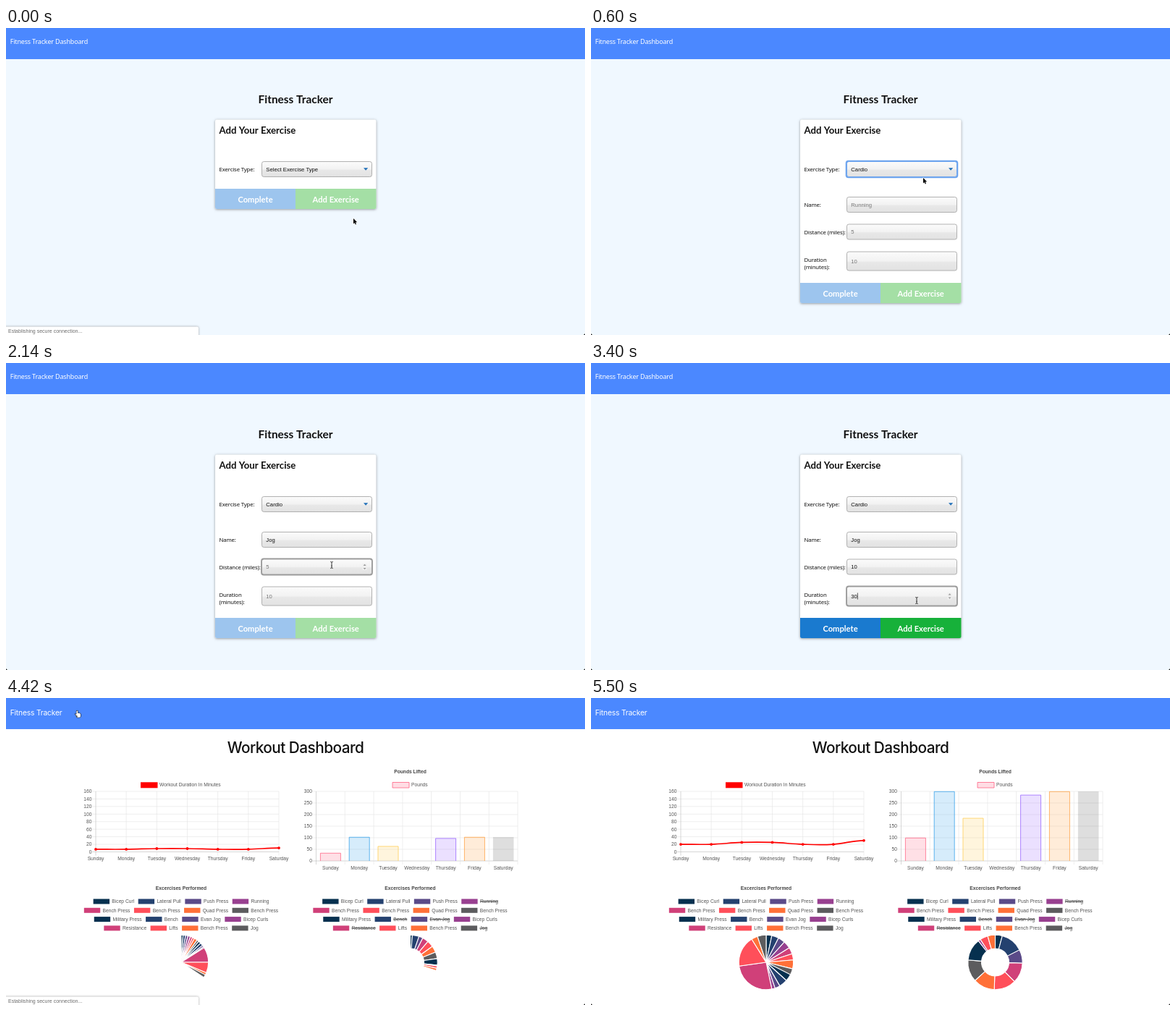
Write an HTML page with a canvas that moves like this. It is 800 by 424 pixels and loops after 5.52 s.

```html
<!DOCTYPE html>
<html lang="en">
<head>
<meta charset="utf-8">
<title>Fitness Tracker</title>
<style>
html, body { margin: 0; width: 100%; height: 100%; overflow: hidden; background: #f0f8ff; }
canvas { display: block; }
</style>
</head>
<body>
<canvas id="stage" width="800" height="424"></canvas>
<script>
const ctx = document.getElementById('stage').getContext('2d');
const LOOP = 5520, DASHBOARD = 4280, CLEARED = 3720, CARDIO = 480;
const HELV = '"Liberation Sans", Arial, sans-serif';
const LATO = 'Lato, sans-serif';
const HUMAN = '"Noto Sans", "Open Sans", sans-serif';
const UI = 'Inter, sans-serif';
const DAYS = ['Sunday', 'Monday', 'Tuesday', 'Wednesday', 'Thursday', 'Friday', 'Saturday'];
const PALETTE = ['#06304f', '#24416f', '#5a4a88', '#984090', '#d04079', '#ff4f5a', '#ff7038', '#5c5c5e'];
const EXERCISES = [
  ['Bicep Curl', 'Lateral Pull', 'Push Press', 'Running'],
  ['Bench Press', 'Bench Press', 'Quad Press', 'Bench Press'],
  ['Military Press', 'Bench', 'Evan Jog', 'Bicep Curls'],
  ['Resistance', 'Lifts', 'Bench Press', 'Jog']
];
const HIDDEN = [3, 9, 10, 12, 15];
const PIE_ENDS = [12, 27, 42, 58, 72, 85, 104, 117, 132, 150, 161, 168, 262, 328, 341.5, 360];
const RING_ENDS = [15, 63, 92, 135, 182, 228, 275, 322, 327, 344, 360];
const MINUTES = [20, 20, 25, 25, 20, 20, 30];
const POUNDS = [100, 300, 185, 0, 285, 300, 300];
const BAR_RGB = ['255,99,132', '54,162,235', '255,206,86', '75,192,192', '153,102,255', '255,159,64'];

const FIELDS = [
  { y: 233.5, h: 21, hint: 'Running', value: 'Jog', keys: [960, 1080, 1180], focus: [860, 2060], label: ['Name:'] },
  { y: 271, h: 21, hint: '5', value: '10', keys: [2500, 2640], focus: [2060, 3100], label: ['Distance (miles):'], number: true },
  { y: 309, h: 26, hint: '10', value: '30', keys: [3240, 3340], focus: [3100, 3700], label: ['Duration', '(minutes):'], number: true }
];

// pointer path: time, x, y
const PATH = [
  [60, 480, 263], [220, 465, 196], [400, 465, 196], [520, 459, 207], [620, 459, 207],
  [860, 455, 243], [1700, 455, 243], [2020, 450, 279], [2860, 450, 279], [3080, 450, 328],
  [3420, 450, 328], [3640, 455, 366], [3800, 455, 366], [4160, 99, 18], [5080, 99, 18], [5240, 60, -14]
];

const during = (t, a, b) => t >= a && t < b;
const outQuart = p => 1 - Math.pow(1 - Math.min(1, Math.max(0, p)), 4);

function text(str, x, y, size, family, opt = {}) {
  ctx.font = `${opt.weight || 400} ${size}px ${family}`;
  ctx.letterSpacing = (opt.track || 0) + 'px';
  ctx.textAlign = opt.align || 'left';
  ctx.textBaseline = 'alphabetic';
  ctx.fillStyle = opt.color || '#111';
  ctx.fillText(str, x, y);
  ctx.letterSpacing = '0px';
}

function rect(x, y, w, h, color) {
  ctx.fillStyle = color;
  ctx.fillRect(x, y, w, h);
}

function line(x1, y1, x2, y2, color, width = 0.6) {
  ctx.strokeStyle = color;
  ctx.lineWidth = width;
  ctx.beginPath();
  ctx.moveTo(x1, y1);
  ctx.lineTo(x2, y2);
  ctx.stroke();
}

function roundPath(x, y, w, h, r) {
  ctx.beginPath();
  ctx.roundRect(x, y, w, h, r);
}

function polygon(pts, color) {
  ctx.beginPath();
  pts.forEach(([x, y]) => ctx.lineTo(x, y));
  ctx.closePath();
  ctx.fillStyle = color;
  ctx.fill();
}

function shadowBox(x, y, w, h, r, blur, dy) {
  ctx.save();
  ctx.shadowColor = 'rgba(0,0,0,.4)';
  ctx.shadowBlur = blur;
  ctx.shadowOffsetY = dy;
  ctx.fillStyle = '#fff';
  roundPath(x, y, w, h, r);
  ctx.fill();
  ctx.restore();
}

function pointerAt(t) {
  if (t <= PATH[0][0]) return PATH[0].slice(1);
  const i = PATH.findIndex(p => p[0] > t);
  if (i < 0) return PATH[PATH.length - 1].slice(1);
  const a = PATH[i - 1], b = PATH[i];
  const p = (t - a[0]) / (b[0] - a[0]), e = p * p * (3 - 2 * p);
  return [a[1] + (b[1] - a[1]) * e, a[2] + (b[2] - a[2]) * e];
}

function drawHeader() {
  rect(0, 0, 800, 43, '#4b88ff');
}

function drawStatus() {
  shadowBox(-4, 412.5, 270, 16, 2, 3, 0);
  text('Establishing secure connection...', 3, 420.8, 7, HELV, { color: '#6d6d6d' });
}

function drawCorners() {
  polygon([[0, 422], [2, 424], [0, 424]], '#222');
  polygon([[800, 422], [798, 424], [800, 424]], '#222');
}

// ---- form ----
function drawControl(y, h, ring, ringWidth) {
  const x = 353.5, w = 152;
  if (ring) {
    ctx.fillStyle = ring;
    roundPath(x - ringWidth, y - ringWidth, w + 2 * ringWidth, h + 2 * ringWidth, 4);
    ctx.fill();
  }
  const g = ctx.createLinearGradient(0, y, 0, y + h);
  g.addColorStop(0, '#fbfbfb');
  g.addColorStop(0.5, '#f2f2f2');
  g.addColorStop(0.56, '#e8e8e8');
  g.addColorStop(1, '#e2e2e2');
  ctx.fillStyle = g;
  roundPath(x, y, w, h, 2.8);
  ctx.fill();
  ctx.strokeStyle = ring || '#a9a9a9';
  ctx.lineWidth = 0.9;
  ctx.stroke();
}

function drawField(f, t, mouse) {
  const mid = f.y + f.h / 2;
  const value = t < CLEARED ? f.value.slice(0, f.keys.filter(k => k <= t).length) : '';
  const focused = during(t, ...f.focus);
  drawControl(f.y, f.h, focused && '#999', 1.4);
  f.label.forEach((s, i) =>
    text(s, 294.5, mid + 2.9 + (f.label.length > 1 ? i * 10.3 - 2.2 : 0.3), 7.8, HUMAN, { track: -0.156 }));
  text(value || f.hint, 359.3, mid + 2.6, 7.7, HELV, { color: value ? '#111' : '#777' });
  if (focused && value) {
    const last = f.keys.filter(k => k <= t).pop();
    const x = 359.8 + ctx.measureText(value).width;
    if ((t - last) % 900 < 450) line(x, mid - 4.5, x, mid + 4.5, '#111', 0.7);
  }
  if (f.number && overBox(mouse, f)) {
    rect(492.5, mid - 4.5, 6, 9, '#f0f0f0');
    polygon([[493.6, mid - 1.5], [495.6, mid - 3.8], [497.6, mid - 1.5]], '#999');
    polygon([[493.6, mid + 1.5], [495.6, mid + 3.8], [497.6, mid + 1.5]], '#999');
  }
}

const overBox = ([x, y], f) => during(x, 353, 506) && during(y, f.y, f.y + f.h);

function drawForm(t, mouse) {
  const open = t >= CARDIO, ready = t >= FIELDS[2].keys[0];
  const bottom = open ? 380 : 250;
  rect(0, 0, 800, 424, '#f0f8ff');
  drawHeader();
  text('Fitness Tracker Dashboard', 5.7, 22.2, 9, HUMAN, { color: '#fff', track: -0.18 });
  text('Fitness Tracker', 400, 104, 15.4, LATO, { weight: 700, align: 'center' });

  shadowBox(289, 126.5, 222.5, bottom - 126.5, 2.2, 3.5, 0.8);
  text('Add Your Exercise', 294.5, 145.5, 13.2, LATO, { weight: 700 });
  text('Exercise Type:', 294.5, 198.2, 7.8, HUMAN, { track: -0.156 });
  drawControl(184.5, 21, during(t, 220, 860) && '#6ba3ee', 1.8);
  text(open ? 'Cardio' : 'Select Exercise Type', 359.3, 197.7, 7.7, HELV);
  polygon([[494, 193.3], [500.2, 193.3], [497.1, 196.8]], '#1f6fb8');
  if (open) FIELDS.forEach(f => drawField(f, t, mouse));

  const top = bottom - 28;
  ctx.save();
  roundPath(289, top, 222.5, 28, [0, 0, 2.2, 2.2]);
  ctx.clip();
  rect(289, top, 111, 28, ready ? '#1a7acf' : '#9dc5ee');
  rect(400, top, 112, 28, ready ? '#17b13a' : '#a4dfa5');
  ctx.restore();
  const label = { weight: 700, align: 'center', color: '#fff' };
  text('Complete', 344.5, top + 18.8, 11.2, LATO, label);
  text('Add Exercise', 455.7, top + 18.8, 11.2, LATO, label);
}

// ---- dashboard ----
const GRID = '#e3e3e3', AXIS = '#bdbdbd', INK = '#555';
const small = (s, x, y, opt = {}) => text(s, x, y + 2.4, 6.7, HELV, { color: INK, ...opt });

function drawAxes(x, right, top, base, max, step) {
  for (let v = 0; v <= max; v += step) {
    const y = base - (base - top) * v / max;
    line(x - 5, y, right, y, v ? GRID : AXIS);
    small(String(v), x - 5.5, y, { align: 'right' });
  }
}

function drawMinutes(k) {
  const x0 = 124, step = 42.17, base = 212.5, top = 129;
  drawAxes(x0, 377, top, base, 160, 20);
  DAYS.forEach((d, i) => {
    const x = x0 + i * step;
    line(x, top, x, base + 5, i ? GRID : AXIS);
    small(d, x, 222, { align: 'center' });
  });
  rect(186, 116.3, 23.5, 8, '#f00');
  small('Workout Duration In Minutes', 212, 120);

  const pts = MINUTES.map((m, i) => [x0 + i * step, base - m * k * (base - top) / 160]);
  const slope = i => i && i < 6 ? (pts[i + 1][1] - pts[i - 1][1]) * 0.2 : 0;
  ctx.strokeStyle = ctx.fillStyle = '#f00';
  ctx.lineWidth = 1.7;
  ctx.beginPath();
  ctx.moveTo(...pts[0]);
  for (let i = 1; i < 7; i++) {
    const [ax, ay] = pts[i - 1], [bx, by] = pts[i];
    ctx.bezierCurveTo(ax + step * 0.4, ay + slope(i - 1), bx - step * 0.4, by - slope(i), bx, by);
  }
  ctx.stroke();
  pts.forEach(([x, y]) => {
    ctx.beginPath();
    ctx.arc(x, y, 1.9, 0, 7);
    ctx.fill();
  });
}

function drawPounds(k) {
  const x0 = 428.5, step = 39.8, base = 225, top = 129;
  small('Pounds Lifted', 558.5, 101.3, { align: 'center', weight: 700, color: '#444' });
  rect(534, 116.5, 23, 7.5, 'rgba(255,99,132,.22)');
  ctx.strokeStyle = 'rgb(255,99,132)';
  ctx.lineWidth = 0.8;
  ctx.strokeRect(534, 116.5, 23, 7.5);
  small('Pounds', 560, 120);
  drawAxes(x0, 707, top, base, 300, 50);
  for (let i = 0; i < 8; i++) line(x0 + i * step, top, x0 + i * step, base + 5, i ? GRID : AXIS);
  DAYS.forEach((d, i) => {
    const mid = x0 + (i + 0.5) * step, rgb = BAR_RGB[i];
    const y = base - POUNDS[i] * k * (base - top) / 300;
    small(d, mid, 234.3, { align: 'center' });
    if (!POUNDS[i]) return;
    rect(mid - 14.3, y, 28.6, base - y, rgb ? `rgba(${rgb},.2)` : 'rgba(0,0,0,.13)');
    if (!rgb) return;
    ctx.strokeStyle = `rgb(${rgb})`;
    ctx.lineWidth = 0.75;
    ctx.beginPath();
    ctx.moveTo(mid - 14, base);
    ctx.lineTo(mid - 14, y + 0.3);
    ctx.lineTo(mid + 14, y + 0.3);
    ctx.lineTo(mid + 14, base);
    ctx.stroke();
  });
}

function drawLegend(cx, hidden) {
  small('Excercises Performed', cx, 262.5, { align: 'center', weight: 700, color: '#444' });
  EXERCISES.forEach((row, r) => {
    ctx.font = `400 6.7px ${HELV}`;
    const widths = row.map(s => ctx.measureText(s).width);
    const total = widths.reduce((a, w) => a + w + 31.2, -5.5);
    let x = cx - total / 2;
    const y = 281 + r * 12.3;
    row.forEach((s, c) => {
      const i = r * 4 + c;
      rect(x, y - 3.5, 22.4, 7, PALETTE[i % 8]);
      small(s, x + 25.7, y);
      if (hidden.includes(i)) line(x + 25.7, y, x + 25.7 + widths[c], y, '#444', 1);
      x += widths[c] + 31.2;
    });
  });
}

function drawSlices(cx, ends, ids, inner, k) {
  const cy = 365, rad = deg => deg * k * Math.PI / 180 - Math.PI / 2;
  ends.forEach((end, i) => {
    const a = rad(i ? ends[i - 1] : 0), b = rad(end);
    ctx.beginPath();
    ctx.arc(cx, cy, 37.7, a, b);
    if (inner) ctx.arc(cx, cy, inner, b, a, true);
    else ctx.lineTo(cx, cy);
    ctx.closePath();
    ctx.fillStyle = PALETTE[ids[i] % 8];
    ctx.fill();
    ctx.strokeStyle = '#fff';
    ctx.lineWidth = 1.1;
    ctx.lineJoin = 'bevel';
    ctx.stroke();
  });
}

function drawDashboard(t) {
  const k = outQuart((t - 4321) / 1000), ringK = outQuart((t - 4336) / 1000);
  const all = PIE_ENDS.map((_, i) => i);
  rect(0, 0, 800, 424, '#fff');
  drawHeader();
  text('Fitness Tracker', 5.7, 24.4, 10.3, UI, { color: '#fff', track: -0.2 });
  text('Workout Dashboard', 400, 76, 20.8, UI, { weight: 500, align: 'center', track: -0.55 });
  drawMinutes(k);
  drawPounds(k);
  drawLegend(242, []);
  drawLegend(558.5, HIDDEN);
  if (k > 0) drawSlices(242, PIE_ENDS, all, 0, k);
  if (ringK > 0) drawSlices(558.5, RING_ENDS, all.filter(i => !HIDDEN.includes(i)), 19, ringK);
}

// ---- pointer ----
function outline(fill, edge) {
  ctx.lineJoin = 'round';
  ctx.strokeStyle = edge;
  ctx.lineWidth = 1.1;
  ctx.stroke();
  ctx.fillStyle = fill;
  ctx.fill();
}

function drawPointer(t, [x, y]) {
  if (during(t, 960, 1700) || during(t, 2500, 2840)) return;
  const typing = t >= CARDIO && t < DASHBOARD && FIELDS.some(f => overBox([x, y], f));
  const link = during(t, 4100, 4520) || during(t, 3600, 3860);
  ctx.save();
  ctx.translate(x, y);
  if (typing) {
    line(0, -4, 0, 4, '#222', 0.9);
    for (const s of [-1, 1]) {
      line(-1.8, s * 4.6, 0, s * 3.9, '#222', 0.8);
      line(1.8, s * 4.6, 0, s * 3.9, '#222', 0.8);
    }
    line(-1, 1.2, 1, 1.2, '#222', 0.6);
  } else if (link) {
    ctx.beginPath();
    ctx.roundRect(-1.6, -0.5, 1.8, 7, 0.9);
    ctx.roundRect(-1.6, 3, 5.6, 5.8, 1.6);
    ctx.moveTo(-3.6, 4);
    ctx.lineTo(-0.5, 8.4);
    ctx.lineTo(-0.5, 5);
    ctx.closePath();
    outline('#fff', '#111');
  } else {
    ctx.beginPath();
    [[0, 0], [0, 7.4], [1.7, 5.9], [2.8, 8.5], [4, 8], [2.9, 5.5], [5.2, 5.3]].forEach(p => ctx.lineTo(...p));
    ctx.closePath();
    outline('#000', '#fff');
  }
  ctx.restore();
}

function draw(t) {
  const mouse = pointerAt(t);
  if (t < DASHBOARD) drawForm(t, mouse);
  else drawDashboard(t);
  drawCorners();
  if (t < 300 || during(t, 4200, 4700)) drawStatus();
  drawPointer(t, mouse);
}

const start = performance.now();
function tick() {
  draw((performance.now() - start) % LOOP);
  requestAnimationFrame(tick);
}
tick();
</script>
</body>
</html>
```
